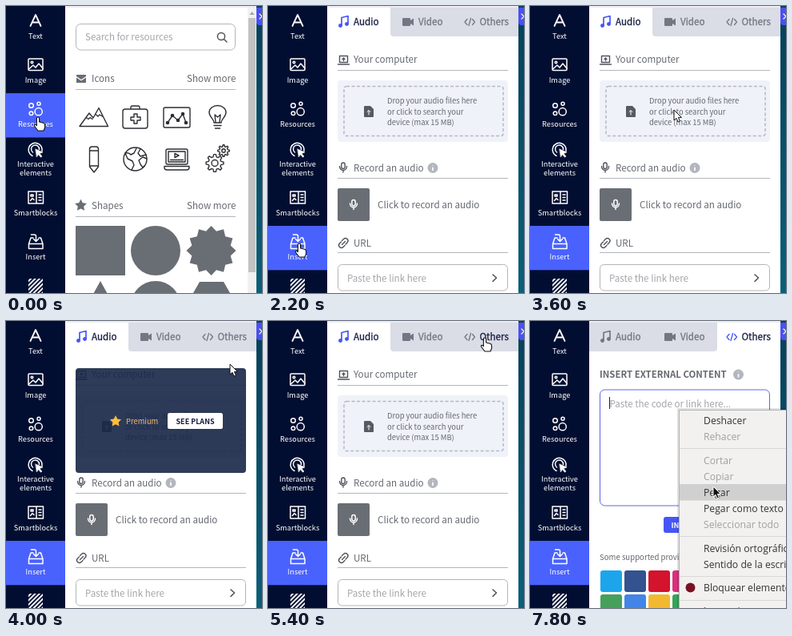
An HTML page for the animation above (8 s loop, 320 by 359 pixels).

```html
<!DOCTYPE html>
<html lang="en">
<head>
<meta charset="utf-8">
<title>Insert panel walkthrough</title>
<style>
html, body { margin: 0; width: 100%; height: 100%; overflow: hidden; background: #fff; }
svg { display: block; width: 100%; height: 100%; }
text { font: 11.6px "Noto Sans CJK SC", "Noto Sans CJK JP", "Noto Sans", sans-serif; fill: #64686f; white-space: pre; }
.side text { font-size: 9.25px; fill: #fff; text-anchor: middle; }
.small { font-size: 9.4px; }
.hint { fill: #a3a5aa; }
.bold { font-weight: 700; }
.line { fill: none; stroke-linecap: round; stroke-linejoin: round; }
.side .line { stroke: #fff; stroke-width: 1.5; }
.art { stroke: #2c2e33; stroke-width: 1.4; }
.ui { stroke: #50545c; stroke-width: 1.4; }
.rule { stroke: #b4b6ba; }
.field { fill: #fff; stroke: #b3b5b9; }
.grey { fill: #696d74; }
.tab text { font-weight: 500; stroke-width: .3; }
#menu text { font: 12.2px "Open Sans", "Noto Sans", sans-serif; fill: #333; }
#menu .off { fill: #a0a0a0; }
</style>
</head>
<body>
<svg viewBox="0 0 320 359" preserveAspectRatio="none">
  <defs>
    <linearGradient id="sea" x2="0" y2="1"><stop stop-color="#06405a"/><stop offset="1" stop-color="#0a6078"/></linearGradient>
    <pattern id="hatch" width="3.8" height="3.8" patternUnits="userSpaceOnUse" patternTransform="rotate(45)">
      <path d="M1 0V4" stroke="#fff" stroke-width="1.9"/>
    </pattern>
    <g id="mic" class="line">
      <rect x="-2.2" y="-6" width="4.4" height="7.5" rx="2.2"/><path d="M-4.5-1.5a4.5 5 0 0 0 9 0M0 3.6V6"/>
    </g>
    <g id="info"><circle r="6.5" fill="#b3b6be"/><path d="M0-.8V3.5M0-3.6V-3" stroke="#fff" stroke-width="1.7"/></g>
  </defs>
  <rect width="320" height="359" fill="#fff"/>

  <g id="resources">
    <rect class="field" x="87.5" y="22.5" width="199" height="32.5" rx="6"/>
    <text class="hint" x="99" y="43">Search for resources</text>
    <g class="line" stroke="#50535a" stroke-width="1.5"><circle cx="269" cy="38" r="4.6"/><path d="M272.5 41.5l3.5 3.5"/></g>
    <path d="M88 86h12v2l-6 4-6-4zM88 89.5l6 4 6-4V96H88z" class="grey"/>
    <text x="107" y="95">Icons</text><text x="226" y="95">Show more</text>
    <path class="rule" d="M87 104.5H287"/>
    <g class="line art">
      <path d="M92 150.500l12-16.500 5 6 7-12.500 11.500 23zM100 139.500l3 2 2-2 3 2M112 135.500l3 2.500 2-2 3.500 2"/>
      <path d="M149 129h25q3 0 3 3v18q0 3-3 3h-25q-3 0-3-3v-18q0-3 3-3zM156 129v-2q0-2 2-2h7q2 0 2 2v2M160 135h4v4h4v4h-4v4h-4v-4h-4v-4h4z"/>
      <rect x="197" y="127" width="33" height="25" rx="2"/><path d="M202 146l6-9 7 6 6-8 4 11"/>
      <path d="M260 146c0-5-6-7-6-13a10.500 8.500 0 0 1 21 0c0 6-6 8-6 13zM260 149.500h9M261.500 153h6M262 145l-1-9 3.500 3 3.500-3-1 9"/>
      <path d="M104.500 179q0-3 3-3h5q3 0 3 3v22l-5.500 7-5.500-7zM104.500 181h11M104.500 200h11"/>
      <circle cx="161.500" cy="191.500" r="14.500"/>
      <path d="M149 184q5-1 7 2l4-2 3-6M149 184l3 7 6 3 2 5-3 6M168 179l-3 5 3 4 7-2M176 191l-5-2-5 4 2 5 3 4 2-2"/>
      <rect x="200" y="179" width="27" height="19" rx="2"/><rect x="203" y="182" width="21" height="13"/>
      <path d="M205.500 192.500h16M211 184.500l5 2.500-5 2.500zM198 200.500h31v1.500q0 3-3 3h-25q-3 0-3-3z"/>
      <polygon data-star="261,196.5,11,8,8,.12"/><circle cx="261" cy="196.500" r="4"/>
      <polygon data-star="272,181,7.3,5.2,8,.12"/><circle cx="272" cy="181" r="2.200"/>
    </g>
    <g fill="#2c2e33"><circle cx="202" cy="146" r="2.300"/><circle cx="208" cy="137" r="2.300"/><circle cx="215" cy="143" r="2.300"/><circle cx="221" cy="135" r="2.300"/><circle cx="225" cy="146" r="2.300"/></g>
    <polygon class="grey" data-star="93.5,249.5,7.8,3.9,5"/>
    <text x="107" y="253.500">Shapes</text><text x="226" y="253.500">Show more</text>
    <path class="rule" d="M87 263.500H287"/>
    <g class="grey">
      <rect x="87" y="275" width="62" height="62"/><circle cx="187" cy="306" r="31"/>
      <polygon data-star="256.5,306,31,25,12"/>
      <path d="M118 344l31 56H87zM242 345h30l16 28-16 28h-30l-16-28z"/><circle cx="187" cy="375" r="31"/>
    </g>
    <rect x="302" width="11" height="359" fill="#f1f1f1"/><rect x="303" y="15" width="9" height="318" fill="#c2c2c2"/>
    <path d="M304.500 11h6l-3-4z" fill="#a3a3a3"/>
  </g>

  <g id="audio">
    <g class="line ui">
      <rect x="89.500" y="62.500" width="10" height="8"/><path d="M87.500 73h14M94.500 68.500v-3.500M93 66.500l1.500-1.500 1.500 1.500"/>
      <use href="#mic" x="94" y="202"/>
      <path d="M92.500 298.500l4-4M92.500 293.500l2-2a3 3 0 0 1 4.500 4.500l-2 2M96 299.500l-2 2a3 3 0 0 1-4.500-4.500l2-2"/>
    </g>
    <text x="107" y="71">Your computer</text><path class="rule" d="M87 80.500H300"/>
    <rect x="87" y="93" width="213" height="77" rx="4" fill="#f0f2f9"/>
    <rect x="95" y="100.500" width="199" height="62" rx="3" fill="none" stroke="#b4b8c2" stroke-width="1.500" stroke-dasharray="4 2.500"/>
    <path d="M121 125h7l4 4v9q0 1-1 1h-10q-1 0-1-1v-12q0-1 1-1z" fill="#565a63"/><path d="M126 136v-5M124 132.500l2-2 2 2" class="line" stroke="#fff"/>
    <g><text class="small" x="149" y="122">Drop your audio files here</text><text class="small" x="149" y="135.500">or click to search your</text><text class="small" x="149" y="149">device (max 15 MB)</text></g>
    <text x="107" y="206.500">Record an audio</text><use href="#info" x="206" y="202.500"/><path class="rule" d="M87 215.500H300"/>
    <rect class="grey" x="87" y="228" width="40" height="41" rx="2"/><use href="#mic" x="107" y="248.500" stroke="#fff" stroke-width="1.500"/>
    <text x="137" y="252.500">Click to record an audio</text>
    <text x="107" y="301">URL</text><path class="rule" d="M87 308.500H300"/>
    <rect class="field" x="87.500" y="323.500" width="212" height="32.500" rx="5"/>
    <text class="hint" x="99" y="344.500">Paste the link here</text><path class="line" d="M281 336l4.500 4-4.500 4.500" stroke="#50535a" stroke-width="1.600"/>
    <g id="premium">
      <rect x="87" y="59" width="213" height="131" rx="4" fill="#182647" fill-opacity=".9"/>
      <polygon data-star="137,125.5,7.5,3.8,5" fill="#ffbd3d"/>
      <text class="small" x="150" y="128.500" style="fill:#efb76a">Premium</text>
      <rect x="202" y="115" width="69" height="20" rx="2.500" fill="#fff"/>
      <text class="bold" x="236.500" y="128.500" text-anchor="middle" style="font-size:9px;fill:#131a3c">SEE PLANS</text>
    </g>
  </g>

  <g id="others">
    <text class="bold" x="87" y="71" style="font-size:11.4px">INSERT EXTERNAL CONTENT</text><use href="#info" x="260.500" y="67"/>
    <rect id="area" class="field" x="87.500" y="86" width="212" height="145" rx="6"/>
    <text class="hint" x="99.500" y="107.500">Paste the code or link here...</text>
    <path id="caret" d="M99.500 95v15" stroke="#222"/>
    <rect x="167" y="245" width="52" height="20" rx="3" fill="#4656f6"/>
    <text class="bold" x="193" y="258.500" text-anchor="middle" style="font-size:9.2px;fill:#fff">INSERT</text>
    <text x="87" y="298.500" style="font-size:9.6px">Some supported providers:</text>
    <g id="providers"></g>
  </g>

  <g id="tabs">
    <path id="tabBack" fill="#dadce6"/>
    <g class="tab"><path d="M92 24V14.500l8-2v9" class="line" stroke-width="1.700"/><circle cx="90.500" cy="24.500" r="2"/><circle cx="98.500" cy="22.500" r="2"/><text x="107" y="24">Audio</text></g>
    <g class="tab"><path d="M169 15h8q1 0 1 1v2l4-2.500v9l-4-2.500v2q0 1-1 1h-8q-1 0-1-1v-8q0-1 1-1z" stroke="none"/><text x="188" y="24">Video</text></g>
    <g class="tab"><path d="M249 16.500l-3 3.500 3 3.500M255.500 16.500l3 3.500-3 3.500M253.500 15.500l-2.500 9" class="line" stroke-width="1.300"/><text x="264.500" y="24">Others</text></g>
  </g>
  <rect x="74" width="246" height="2" fill="#ececf0"/>
  <rect x="313" width="7" height="359" fill="url(#sea)"/>
  <path d="M320 2h-7v18q0 4 4 4h3z" fill="#4a50f2"/><path d="M317 10l3 3-3 3" class="line" stroke="#fff" stroke-width="1.200"/>

  <g class="side">
    <rect width="74" height="359" fill="#020e31"/>
    <rect id="hover" width="74" height="55.300" fill="#1b2744"/><rect id="active" width="74" height="55.300" fill="#4a62fd"/>
    <g class="line">
      <path d="M30.500 25L37 11l6.500 14M33 20.500h8" stroke-width="1.800"/>
      <rect x="28" y="66" width="18" height="14.500" rx="1"/><circle cx="32.500" cy="70.500" r="1.300"/><path d="M28.500 79l5.500-5 3 3 4-5 5 6"/>
      <circle cx="31.500" cy="124.500" r="2.800"/><circle cx="41" cy="122.300" r="2"/><circle cx="40.700" cy="132.200" r="4.600"/><circle cx="31.500" cy="134.300" r="2.300"/>
      <path d="M33 187.500a8.500 8.500 0 1 1 12-6M33.500 183a5 5 0 1 1 8-3.500"/><path d="M37 179l9 4-4 1.500 3 3.500-1.500 1.200-3-3.500-2 3z" fill="#fff" stroke-width=".6"/>
      <path d="M28 232h18.500v15H28zM38 232v15M41 236h3M41 239.500h3M41 243h3M30.500 243.500l2.500-3 2 2M31 236h3v2h-3z"/>
      <path d="M28.500 297.500H46v6H28.500zM34 290h-3l-2.500 7.500M41 290h2.500l2.500 7.500M31.500 286h4q2 0 2 2v6M34.500 291.500l3 3 3-3"/>
    </g>
    <rect x="28" y="341" width="18" height="19" fill="url(#hatch)"/>
    <text x="37" y="41">Text</text><text x="37" y="96">Image</text><text x="37" y="151">Resources</text>
    <text x="37" y="201">Interactive</text><text x="37" y="212">elements</text><text x="37" y="262">Smartblocks</text><text x="37" y="317">Insert</text>
  </g>

  <g id="menu">
    <rect x="184" y="109" width="140" height="260" fill="#000" opacity=".12"/>
    <rect x="186.500" y="111.500" width="140" height="260" fill="#f2f1f0" stroke="#b4b4b4"/>
    <rect id="row" x="187" width="140" height="20.500" fill="#d0d0d0"/>
    <path d="M187 159.500h133M187 269.500h133M187 319.500h133M187 349.500h133" stroke="#d8d8d8"/>
    <g id="entries"></g>
    <circle cx="200.500" cy="333.500" r="6" fill="#7c1020"/>
  </g>

  <g id="cursor" stroke-linejoin="round">
    <path id="hand" d="M-1.600 1.600a1.600 1.600 0 0 1 3.200 0V6l5 1.200q2 .6 2 2.500V13l-1.600 4H0l-4.500-6q-.6-2 1.500-1.600l1.400 1.200z" fill="#fff" stroke="#111" stroke-width="1.100"/>
    <path id="arrow" d="M0 0v13l3-2.700 2 4.700 2.400-1-2-4.600h4z"/>
    <path id="beam" d="M-2.500-6.500Q0-6.500 0-5V5Q0 6.500-2.500 6.500M2.500-6.500Q0-6.500 0-5M0 5Q0 6.500 2.500 6.500" fill="none" stroke="#222" stroke-width="1.200"/>
  </g>
</svg>
<script>
const $ = id => document.getElementById(id);
const show = (id, on) => $(id).style.display = on ? '' : 'none';
const LOOP = 8000, STEP = 200, ITEM = 55.3;

// Stars and gears: centre, outer and inner radius, tips, half angle of a flat tip
for (const star of document.querySelectorAll('[data-star]')) {
  const [x, y, outer, inner, tips, flat = 0] = star.dataset.star.split(',').map(Number);
  const points = [];
  for (let i = 0; i < tips * 2; i++) {
    const r = i % 2 ? inner : outer;
    for (const side of [-flat, flat]) {
      const a = i * Math.PI / tips - Math.PI / 2 + side;
      points.push(`${(x + r * Math.cos(a)).toFixed(2)},${(y + r * Math.sin(a)).toFixed(2)}`);
    }
  }
  star.setAttribute('points', points.join(' '));
}

const providerColors = ['#1da5ec', '#33528f', '#d4132d', '#d8307c', '#0a77b4', '#2f4560', '#1681b1',
  '#45a05b', '#4285e8', '#f2b930', '#35a456', '#7048b5', '#17181b', '#17181b'];
$('providers').innerHTML = providerColors.map((color, i) =>
  `<rect x="${88 + i % 7 * 30}" y="${i < 7 ? 312 : 342}" width="27" height="27" rx="3" fill="${color}"/>`).join('');

// Entries: label, baseline, disabled
const entries = [['Deshacer', 129], ['Rehacer', 149, 1], ['Cortar', 179, 1], ['Copiar', 199, 1], ['Pegar', 219],
  ['Pegar como texto sin formato', 239], ['Seleccionar todo', 259, 1], ['Revisión ortográfica', 289],
  ['Sentido de la escritura', 309], ['Bloquear elemento...', 338], ['Inspeccionar', 367]];
$('entries').innerHTML = entries.map(([label, y, off]) =>
  `<text x="217" y="${y}"${off ? ' class="off"' : ''}>${label}</text>`).join('');

// Pointer path: time, x, y
const path = [[0, 40, 139], [200, 40, 139], [1200, 44, 300], [1400, 44, 300], [1800, 39, 297], [2800, 39, 297],
  [3000, 60, 280], [3600, 180, 130], [3800, 255, 80], [4000, 280, 54], [4800, 271, 21], [5600, 271, 21],
  [6000, 225, 85], [6400, 197, 104], [6800, 187, 111], [7200, 187, 111], [7400, 200, 138], [7600, 225, 230], [7800, 229, 207]];

function pointerAt(t) {
  const next = path.findIndex(p => p[0] > t);
  if (next < 0) return path.at(-1).slice(1);
  const [t0, x0, y0] = path[next - 1], [t1, x1, y1] = path[next];
  const k = (t - t0) / (t1 - t0), e = k * k * (3 - 2 * k);
  return [x0 + (x1 - x0) * e, y0 + (y1 - y0) * e];
}

function draw(now) {
  const t = Math.floor(now % LOOP / STEP) * STEP;
  const [x, y] = pointerAt(t);
  const panel = t < 1800 ? 'resources' : t < 5600 ? 'audio' : 'others';
  const menuOpen = t >= 7200, focused = t >= 6800;

  for (const id of ['resources', 'audio', 'others']) show(id, id === panel);
  show('tabs', panel !== 'resources');
  show('premium', t >= 3800 && t < 4200);
  show('caret', focused);
  show('menu', menuOpen);
  $('area').style.stroke = focused ? '#5c68e8' : '#777a80';

  $('active').setAttribute('y', ITEM * (panel === 'resources' ? 2 : 5) - 1.5);
  show('hover', x < 74);
  $('hover').setAttribute('y', ITEM * Math.floor((y + 1.5) / ITEM) - 1.5);

  const current = panel === 'others' ? 2 : 0;
  $('tabBack').setAttribute('d', current ? 'M74 2H234V34q0 4-4 4H74z' : 'M153 2H313V38H157q-4 0-4-4z');
  document.querySelectorAll('.tab').forEach((tab, i) => {
    const hovered = i === 2 && y < 38 && x > 234;
    const color = i === current ? '#4656f6' : '#737783';
    const ink = i === current || hovered ? '#1a2144' : '#737783';
    tab.setAttribute('fill', color);
    tab.setAttribute('stroke', color);
    Object.assign(tab.querySelector('text').style, { fill: ink, stroke: ink });
  });

  const target = entries.find(([, base, off]) => !off && y >= base - 15 && y < base + 6);
  show('row', target);
  if (target) $('row').setAttribute('y', target[1] - 15);

  const shape = t < 3000 || (t >= 4600 && t < 5800) ? 'hand' : t >= 6200 && !menuOpen ? 'beam' : 'arrow';
  for (const id of ['hand', 'arrow', 'beam']) show(id, id === shape);
  $('arrow').setAttribute('fill', menuOpen ? '#111' : '#fff');
  $('arrow').setAttribute('stroke', menuOpen ? '#fff' : '#111');
  $('cursor').setAttribute('transform', `translate(${x} ${y})`);
}

function tick() {
  draw(performance.now());
  requestAnimationFrame(tick);
}
tick();
</script>
</body>
</html>
```
